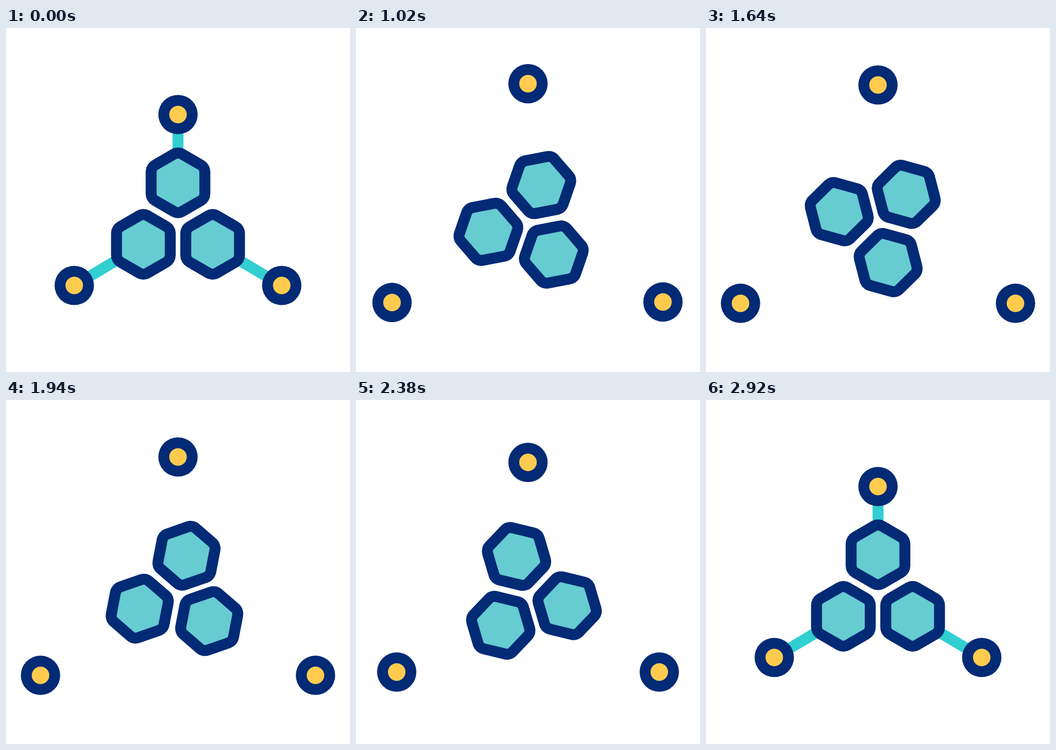
Recreate the animation shown at these times as an HTML page with a canvas. Size 640 by 640 pixels, loop 3.38 s.

```html
<!DOCTYPE html>
<html lang="en">
<head>
<meta charset="utf-8">
<title>Molecule</title>
<style>
  html, body { margin: 0; width: 100%; height: 100%; overflow: hidden; background: #fff; }
  canvas { display: block; width: 100vmin; height: 100vmin; }
</style>
</head>
<body>
<canvas id="stage" width="640" height="640"></canvas>
<script>
const ctx = document.getElementById('stage').getContext('2d');
const LOOP = 3380, STEP = 20, LINE = 20.4;
const CENTER = { x: 320, y: 363.4 };
const NAVY = '#032a75', TEAL = '#66ccd1', ROD = '#31cfd0', YELLOW = '#ffcb4f';

// hex: offset from the center; node: resting place; drift: vector to the floating place;
// keys: [time, share of drift]
const arms = [
  { hex: [0, -75.4], node: [320, 161], drift: [0, -55],
    keys: [[460, 0], [785, 1.164], [1250, 0.927], [1640, 1]] },
  { hex: [-64.4, 39.1], node: [127, 479], drift: [-62.8, 33.2],
    keys: [[460, 0], [785, 1.006], [1250, 0.906], [1640, 1]] },
  { hex: [64.4, 39.1], node: [513, 479], drift: [62.8, 33.2],
    keys: [[460, 0], [785, 1.006], [1190, 0.875], [1520, 1]] }
];

const smooth = u => u * u * (3 - 2 * u);
const progress = (t, a, b) => Math.min(1, Math.max(0, (t - a) / (b - a)));
const ease = (t, a, b) => smooth(progress(t, a, b));

// cubic-bezier(1/6, 0, 5/6, 1)
function brisk(x) {
  let lo = 0, hi = 1;
  for (let i = 0; i < 24; i++) {
    const s = (lo + hi) / 2, r = 1 - s;
    if (r * r * s / 2 + 2.5 * r * s * s + s ** 3 < x) lo = s; else hi = s;
  }
  return smooth(lo);
}

function driftAt(keys, t) {
  let value = 0;
  for (let i = 1; i < keys.length; i++) {
    value += (keys[i][1] - keys[i - 1][1]) * ease(t, keys[i - 1][0], keys[i][0]);
  }
  return value * (1 - brisk(progress(t, 2220, 2920)));
}

function drawRod({ hex, node }, length) {
  if (length <= 0) return;
  const dx = node[0] - CENTER.x - hex[0], dy = node[1] - CENTER.y - hex[1];
  const dist = Math.hypot(dx, dy), inner = 55;
  const outer = inner + (dist - 26.5 - inner) * length;
  ctx.beginPath();
  for (const r of [inner, outer]) ctx.lineTo(hex[0] + dx / dist * r, hex[1] + dy / dist * r);
  ctx.strokeStyle = ROD;
  ctx.lineWidth = LINE;
  ctx.stroke();
}

// Both outlines share one core; the round joins give the corners.
function drawHex([x, y]) {
  ctx.beginPath();
  for (let i = 0; i < 6; i++) {
    const a = Math.PI / 6 + i * Math.PI / 3;
    ctx.lineTo(x + 41.2 * Math.cos(a), y + 41.2 * Math.sin(a));
  }
  ctx.closePath();
  for (const [color, width] of [[NAVY, 49], [TEAL, 8.2]]) {
    ctx.fillStyle = ctx.strokeStyle = color;
    ctx.lineWidth = width;
    ctx.stroke();
    ctx.fill();
  }
}

function drawNode(x, y) {
  for (const [color, radius] of [[NAVY, 36.6], [YELLOW, 16.3]]) {
    ctx.beginPath();
    ctx.arc(x, y, radius, 0, 2 * Math.PI);
    ctx.fillStyle = color;
    ctx.fill();
  }
}

function draw(t) {
  ctx.fillStyle = '#fff';
  ctx.fillRect(0, 0, 640, 640);
  ctx.lineCap = ctx.lineJoin = 'round';

  const rod = 1 - ease(t, 460, 926) + ease(t, 2454, 2920);
  ctx.save();
  ctx.translate(CENTER.x, CENTER.y);
  ctx.rotate(2 * Math.PI * ease(t, 760, 2620));
  arms.forEach(arm => drawRod(arm, rod));
  arms.forEach(arm => drawHex(arm.hex));
  ctx.restore();

  for (const { node, drift, keys } of arms) {
    const k = driftAt(keys, t);
    drawNode(node[0] + drift[0] * k, node[1] + drift[1] * k);
  }
}

let start;
function tick(now) {
  start ??= now;
  draw(Math.floor((now - start) % LOOP / STEP) * STEP);
  requestAnimationFrame(tick);
}
draw(0);
requestAnimationFrame(tick);
</script>
</body>
</html>
```
